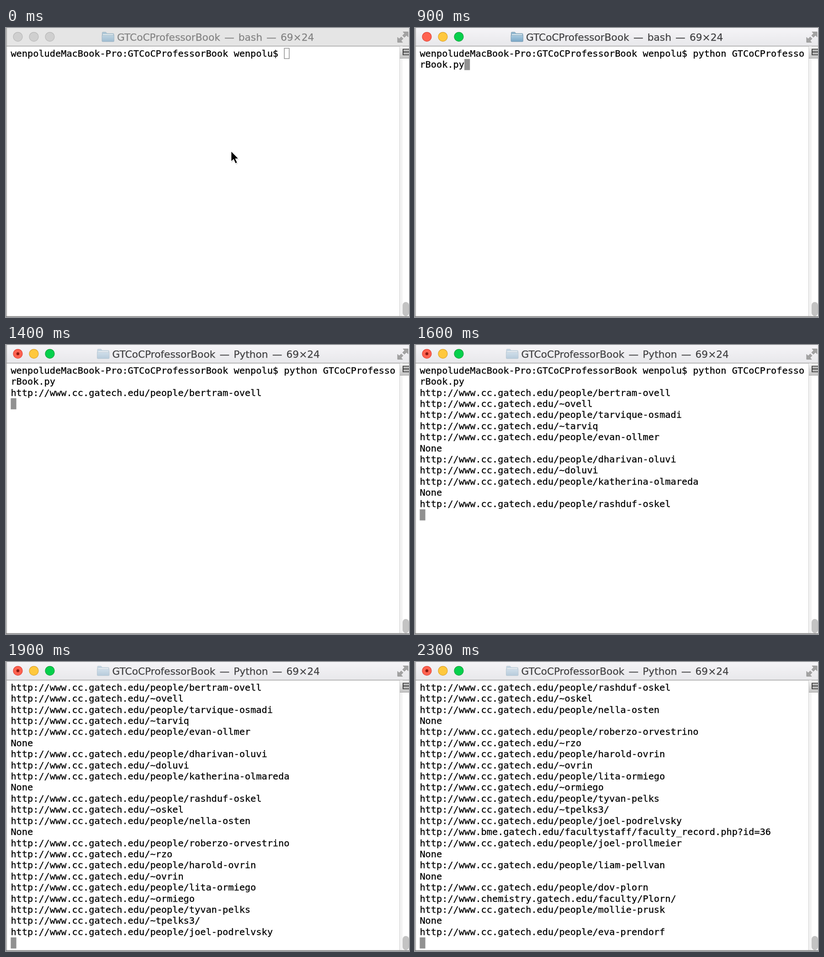
An HTML page that plays this animation: 882x635 px, repeating every 2.4 s.

```html
<!DOCTYPE html>
<html lang="en">
<head>
<meta charset="utf-8">
<title>Terminal</title>
<style>
html, body { margin: 0; width: 100%; height: 100%; overflow: hidden; background: #fff; }
svg { display: block; width: 882px; height: 635px; }
text { white-space: pre; }
#rows { font: 20.27px "DejaVu Sans Mono", monospace; fill: #000; stroke: #000; stroke-width: .3px; }
#title { font: 21.7px "DejaVu Sans", sans-serif; word-spacing: 2.3px; stroke-width: .25px; }
</style>
</head>
<body>
<svg viewBox="0 0 882 635" xmlns="http://www.w3.org/2000/svg">
  <defs>
    <linearGradient id="bar" x2="0" y2="1">
      <stop stop-color="#f5f4f7"/><stop offset="1" stop-color="#e8e8eb"/>
    </linearGradient>
    <linearGradient id="paper" x2="0" y2="1">
      <stop stop-color="#a9cbe0"/><stop offset="1" stop-color="#79a6c6"/>
    </linearGradient>
    <linearGradient id="knob" x2="0" y2="1">
      <stop stop-color="#f4f4f4"/><stop offset="1" stop-color="#c4c4c4"/>
    </linearGradient>
  </defs>
  <rect width="882" height="635" fill="#fff"/>
  <rect id="barFill" width="882" height="39"/>
  <rect y="39" width="882" height="1.5" fill="#a3a3a3"/>
  <g id="lights" stroke-width="1.2">
    <circle cx="26" cy="19.300" r="10"/><circle cx="61" cy="19.300" r="10"/><circle cx="96" cy="19.300" r="10"/>
  </g>
  <circle id="dot" cx="26" cy="19.300" r="3.2" fill="#8e1a10"/>
  <g id="folder">
    <path d="M1 5V2.5Q1 1 2.500 1H9L11.500 4H25Q26.500 4 26.500 5.500V9H1Z" fill="#8db4cd" stroke="#7897aa" stroke-width=".8"/>
    <path d="M2.500 5.500H25V9H2.500Z" fill="#e6f0f5"/>
    <path d="M.5 8H27V20.500Q27 22 25.500 22H2Q.5 22 .5 20.500Z" fill="url(#paper)" stroke="#7193aa" stroke-width=".8"/>
  </g>
  <text id="title" y="27.500"></text>
  <g fill="#a2a2a2" stroke="#8b8b8b" stroke-width=".8">
    <path d="M869 8.500H880V19.500L876.500 16L872 20.500L868 16.500L872.500 12Z"/>
    <path d="M857 20.500L860.500 24L865 19.500L869 23.500L864.500 28L868 31.500H857Z"/>
  </g>

  <rect x="861" y="40" width="1.300" height="593" fill="#cfcfcf"/>
  <rect x="862.300" y="40" width="5.700" height="593" fill="#f3f3f3"/>
  <rect x="862" y="41" width="20" height="25" fill="url(#knob)"/>
  <path d="M862 66.500H882" stroke="#a0a0a0"/>
  <path d="M883 46.500H869V59H883M869 52.700H883" fill="#b9b9b9" stroke="#333" stroke-width="1.700"/>
  <rect x="868" y="602" width="14" height="31" rx="7" fill="#c3c3c3"/>

  <rect id="cursor"/>
  <g id="rows"></g>

  <path d="M1.200 0V635" stroke="#9b9b9b" stroke-width="1.500"/>
  <path d="M0 634H882" stroke="#777" stroke-width="1.600"/>
  <g id="pointer">
    <path d="M1 2V26L6.500 21L10.500 30L15 28L11 19.500H18Z" fill="#000" opacity=".16"/>
    <path d="M0 0V24L5.500 19L9.500 28L14 26L10 17.500H17Z" fill="#000" stroke="#fff" stroke-width="1.500"/>
  </g>
</svg>
<script>
const STEP = 100, COLS = 69, VISIBLE = 24;
const CELL = 12.203, PITCH = 24.41, LEFT = 10.4, TOP = 43.7;
const PROJECT = "GTCoCProfessorBook";
const PROMPT = `wenpoludeMacBook-Pro:${PROJECT} wenpolu$ `;
const COMMAND = `python ${PROJECT}.py`;

// [person, home page]; a page starting with "~" sits on the main host
const people = [
  ["bertram-ovell", "~ovell"],
  ["tarvique-osmadi", "~tarviq"],
  ["evan-ollmer"],
  ["dharivan-oluvi", "~doluvi"],
  ["katherina-olmareda"],
  ["rashduf-oskel", "~oskel"],
  ["nella-osten"],
  ["roberzo-orvestrino", "~rzo"],
  ["harold-ovrin", "~ovrin"],
  ["lita-ormiego", "~ormiego"],
  ["tyvan-pelks", "~tpelks3/"],
  ["joel-podrelvsky", "http://www.bme.gatech.edu/facultystaff/faculty_record.php?id=36"],
  ["joel-prollmeier"],
  ["liam-pellvan"],
  ["dov-plorn", "http://www.chemistry.gatech.edu/faculty/Plorn/"],
  ["mollie-prusk"],
  ["eva-prendorf"]
];
const HOST = "http://www.cc.gatech.edu/";
const output = people.flatMap(([name, page = "None"]) =>
  [HOST + "people/" + name, page[0] === "~" ? HOST + page : page]);

// Each entry takes effect at its step and stays until overridden
const changes = {
  0: { active: false, typed: 0, printed: -1, process: "bash", blink: true, pointer: [492.5, 270] },
  1: { pointer: [496, 140] },
  2: { pointer: [500, 11] },
  4: { active: true },
  5: { typed: 2, pointer: null },
  6: { typed: 5 },
  7: { typed: 7 },
  8: { typed: 9 },
  9: { typed: COMMAND.length },
  10: { printed: 0, process: "bash — Python" },
  11: { process: "Python" },
  12: { blink: false },
  13: { blink: true },
  14: { printed: 1 },
  15: { printed: 7 },
  16: { printed: 11 },
  17: { printed: 15 },
  18: { printed: 19 },
  19: { printed: 23 },
  20: { printed: 25 },
  21: { printed: 27 },
  22: { printed: 29 },
  23: { printed: 33 }
};
const states = [];
for (let i = 0; i < 24; i++) states.push({ ...states[i - 1], ...changes[i] });

// Left edges of the title text and its folder
const titles = { "bash": [243, 209.5], "Python": [232.5, 199], "bash — Python": [188.7, 155] };
const lit = [["#ff6250", "#e0463a"], ["#ffc83d", "#dda32c"], ["#05d04c", "#12a33c"]];
const unlit = ["#cfcfcf", "#b9b9b9"];

const $ = id => document.getElementById(id);
const set = (el, attrs) => Object.entries(attrs).forEach(([k, v]) => el.setAttribute(k, v));
const rowTexts = Array.from({ length: VISIBLE }, (_, i) => {
  const el = document.createElementNS("http://www.w3.org/2000/svg", "text");
  set(el, { x: LEFT, y: TOP + 19.1 + i * PITCH });
  return $("rows").appendChild(el);
});

function drawChrome({ active, process, printed, pointer }) {
  const running = printed >= 0;
  const [titleX, folderX] = titles[process];
  const ink = active ? "#404042" : "#838383";
  $("title").textContent = `${PROJECT} — ${process} — 69×24`;
  set($("title"), { x: titleX, fill: ink, stroke: ink });
  set($("folder"), {
    transform: `translate(${folderX} 8)`,
    opacity: running ? 0.45 : active ? 1 : 0.65
  });
  set($("barFill"), { fill: active ? "url(#bar)" : "#e5e5e5" });
  [...$("lights").children].forEach((light, i) => {
    const [fill, stroke] = active ? lit[i] : unlit;
    set(light, { fill, stroke });
  });
  set($("dot"), { visibility: running ? "visible" : "hidden" });
  set($("pointer"), {
    visibility: pointer ? "visible" : "hidden",
    transform: `translate(${pointer || [0, 0]})`
  });
}

function drawScreen({ active, typed, printed, blink }) {
  const input = PROMPT + COMMAND.slice(0, typed);
  const lines = [input.slice(0, COLS)];
  if (input.length > COLS) lines.push(input.slice(COLS));
  let row = lines.length - 1, col = input.length % COLS;
  if (printed >= 0) {
    lines.push(...output.slice(0, printed));
    row = lines.length;
    col = 0;
  }
  const first = Math.max(0, row + 1 - VISIBLE);
  rowTexts.forEach((el, i) => { el.textContent = lines[first + i] || ""; });
  const inset = active ? 0 : 0.8;
  set($("cursor"), {
    x: LEFT + col * CELL + inset,
    y: TOP + (row - first) * PITCH + inset,
    width: CELL - 2 * inset,
    height: PITCH - 2 * inset,
    fill: active ? "#919191" : "none",
    stroke: active ? "none" : "#919191",
    "stroke-width": 1.5,
    visibility: blink ? "visible" : "hidden"
  });
}

let shown = -1;
function tick() {
  const step = Math.floor(performance.now() / STEP) % states.length;
  if (step !== shown) {
    shown = step;
    drawChrome(states[step]);
    drawScreen(states[step]);
  }
  requestAnimationFrame(tick);
}
tick();
</script>
</body>
</html>
```
